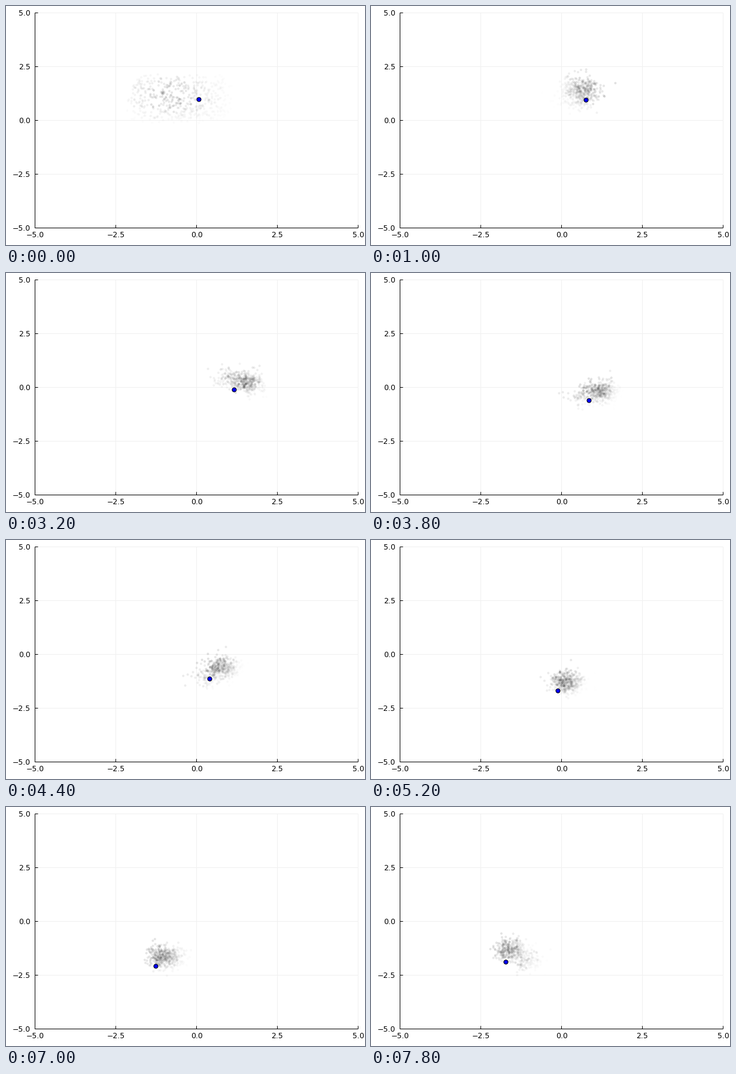
A matplotlib script that plays this animation: 600x400 px, repeating every 8 s.

```python
import numpy as np
import matplotlib.pyplot as plt
from matplotlib.animation import FuncAnimation

W, H, DPI = 600, 400, 100
FRAMES, STEP = 40, 200
N = 500
PT = 72 / DPI                     # points per pixel
LEFT, RIGHT, TOP, BOTTOM = 48.5, 588.5, 11.5, 371.5


def to_px(x, y):
    return (LEFT + (x + 5) * (RIGHT - LEFT) / 10,
            BOTTOM - (y + 5) * (BOTTOM - TOP) / 10)


def smooth(t, ts, vs):
    """Cubic Hermite curve through a few key points."""
    slopes = np.gradient(vs, ts)
    k = np.clip(np.searchsorted(ts, t, side="right") - 1, 0, len(ts) - 2)
    d = ts[k + 1] - ts[k]
    u = (t - ts[k]) / d
    ease = u * u * (3 - 2 * u)
    return (vs[k] + ease * (vs[k + 1] - vs[k])
            + d * u * (1 - u) * ((1 - u) * slopes[k] - u * slopes[k + 1]))


# The ball swings clockwise through these points
key_t = np.array([0, 5, 11, 16, 22, 31, 39])
key_x = np.array([0.07, 0.745, 1.14, 1.165, 0.405, -0.78, -1.73])
key_y = np.array([1.0, 0.95, 0.42, -0.1, -1.12, -2.12, -1.88])
frames = np.arange(FRAMES)
ball_x, ball_y = to_px(smooth(frames, key_t, key_x),
                       smooth(frames, key_t, key_y))
speed_x = np.gradient(ball_x)


def wander(rng, keep=0.85):
    """Correlated unit noise, one (N, 2) set per frame."""
    z = [rng.normal(size=(N, 2))]
    for _ in range(FRAMES - 1):
        z.append(keep * z[-1] + np.sqrt(1 - keep**2) * rng.normal(size=(N, 2)))
    return np.array(z)


rng = np.random.default_rng(12)
noise = wander(rng)
second = rng.random(N) < 0.3
box = rng.uniform([-2, 0], [1, 2], (N, 2)) + rng.normal(0, 0.11, (N, 2))


def first_cloud():
    x, y = to_px(*box.T)
    alpha = 0.1 * np.exp(-((x - 276) / 48)**2 / 2 - ((y - 148) / 25)**2 / 2)
    return np.column_stack([x, y]), alpha


def cloud(i):
    """Two lobes that trail the ball and narrow as the estimate settles."""
    if i == 0:
        return first_cloud()
    settle = np.exp(-i / 2.5)
    spread = np.array([13 + 25 * settle, 9 + 14 * settle])
    center = np.array([ball_x[i] + 17 - 60 * np.exp(-i / 6), ball_y[i] - 14])
    gap = np.array([-30 * np.cos(np.pi * (i - 16) / 26),
                    15 * np.cos(2 * np.pi * (i - 5) / 17)])
    share = np.where(second, 0.7, -0.3)[:, None]
    z = noise[i]
    lead = np.array([0.05 * speed_x[i], -0.15])
    alpha = np.where(second, 0.04, 0.058) * np.clip(1 + z @ lead, 0.1, 2)
    return center + share * gap + z * spread, alpha


fig = plt.figure(figsize=(W / DPI, H / DPI), dpi=DPI, facecolor="white")
ax = fig.add_axes([0, 0, 1, 1])
ax.set_xlim(0, W)
ax.set_ylim(H, 0)
ax.axis("off")


def line(xs, ys, color="black", z=2):
    ax.plot(xs, ys, color=color, lw=PT, zorder=z, solid_capstyle="butt",
            snap=False)


def label(x, y, v, ha):
    ax.text(x, y, f"{v:.1f}".replace("-", "\u2212"), ha=ha, va="baseline",
            family="DejaVu Sans", size=12.4 * PT, color="black")


for v in (-5, -2.5, 0, 2.5, 5):
    x, y = to_px(v, v)
    if v > -5:
        line([x, x], [TOP, BOTTOM], "#f0f0f0", 1)
        line([LEFT, RIGHT], [y, y], "#f0f0f0", 1)
    line([x, x], [BOTTOM - 5, BOTTOM])
    line([LEFT, LEFT + 5], [y, y])
    label(x, 387, v, "center")
    label(41, y + 4.5, v, "right")
line([LEFT, LEFT], [TOP, BOTTOM + 0.5])
line([LEFT - 0.5, RIGHT], [BOTTOM, BOTTOM])

dots = ax.scatter(np.zeros(N), np.zeros(N), s=(4 * PT)**2, linewidths=0,
                  zorder=3)
ball, = ax.plot([], [], "o", ms=7 * PT, mfc="blue", mec="black", mew=PT,
                zorder=4, snap=False)


def draw(i):
    pos, alpha = cloud(i)
    rgba = np.zeros((N, 4))
    rgba[:, 3] = alpha
    dots.set_offsets(pos)
    dots.set_facecolors(rgba)
    ball.set_data([ball_x[i]], [ball_y[i]])
    return dots, ball


anim = FuncAnimation(fig, draw, frames=FRAMES, interval=STEP, repeat=True,
                     repeat_delay=0, init_func=lambda: draw(0))
plt.show()
```
